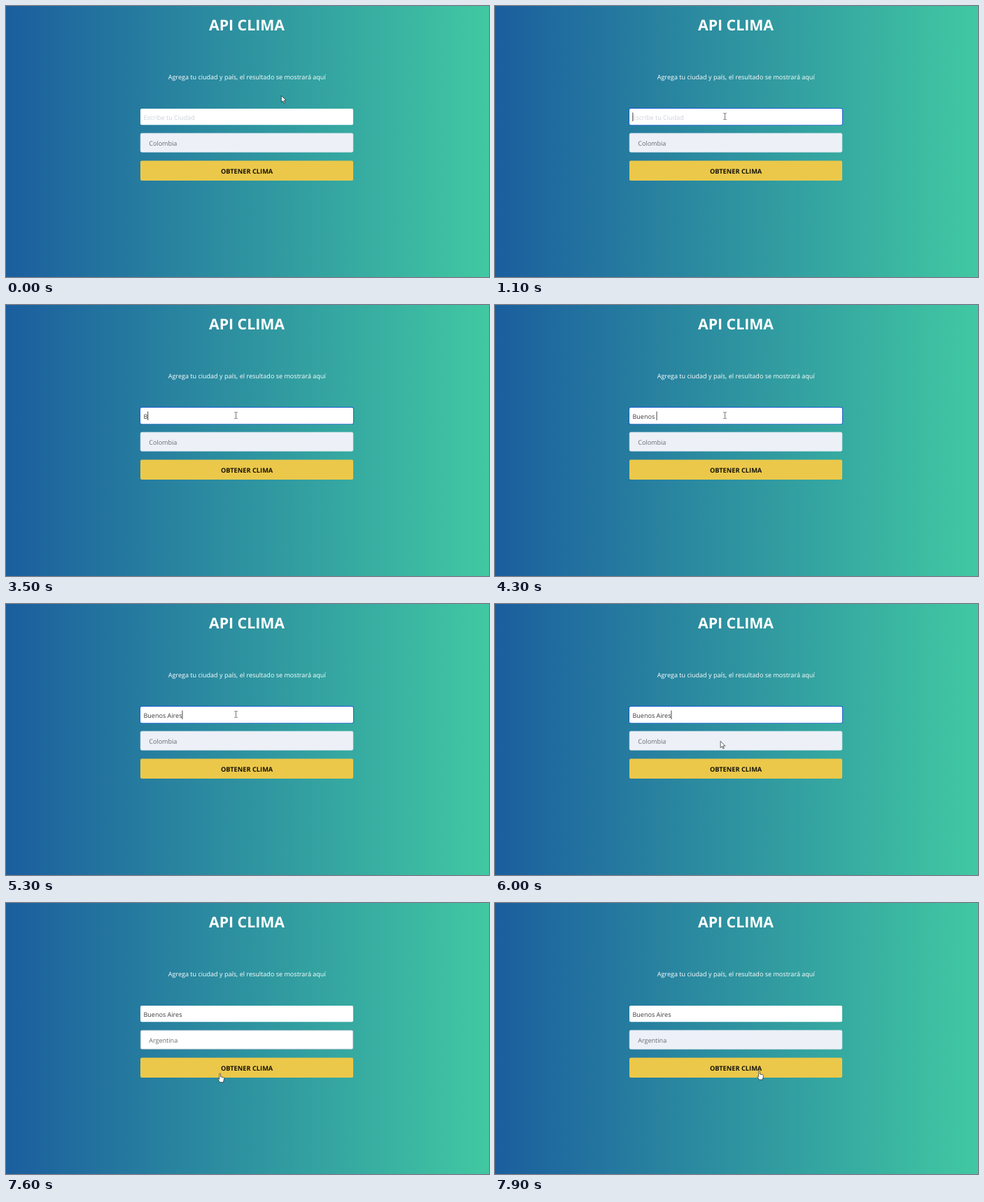
Write an HTML page that moves like this. It is 690 by 388 pixels and loops after 8000 ms.

```html
<!DOCTYPE html>
<html lang="es">
<head>
<meta charset="utf-8">
<title>API Clima</title>
<style>
  html, body { margin: 0; width: 100%; height: 100%; overflow: hidden; }
  body { background: linear-gradient(to right, #1b5e9e, #41c8a2); }
  svg { display: block; width: 690px; height: 388px; }
  text {
    font: 9.05px "Open Sans", "Noto Sans", sans-serif;
    white-space: pre;
    text-rendering: geometricPrecision;
  }
  .mid { text-anchor: middle; }
  .white { fill: #fff; }
  #title { font-size: 21.3px; font-weight: 700; }
  #send { font-size: 9.25px; font-weight: 700; fill: #17140a; }
  #hint { fill: #cdd1d8; }
  #city { fill: #3c3c3c; }
  #country { fill: #686c72; }
  #arrow, #hand { fill: #fff; stroke: #222; stroke-width: .7; stroke-linejoin: round; }
  #beam { fill: none; stroke: #666; stroke-width: .9; }
</style>
</head>
<body>
<svg viewBox="0 0 690 388">
  <text id="title" class="mid white" x="344" y="34.6">API CLIMA</text>
  <text class="mid white" x="344.2" y="105.4">Agrega tu ciudad y país, el resultado se mostrará aquí</text>

  <rect id="ring" x="191" y="146" width="306" height="25" rx="3" fill="#1c5fd0"/>
  <rect x="192" y="147" width="304" height="23.3" rx="2" fill="#fff"/>
  <text id="hint" x="196.4" y="162.6">Escribe tu Ciudad</text>
  <text id="city" x="196.4" y="162.6"></text>
  <rect id="caret" y="152.5" width=".9" height="12.5" fill="#333"/>

  <rect id="select" x="192.2" y="182.2" width="303.6" height="27" rx="2" stroke-width=".6"/>
  <text id="country" x="204.2" y="200"></text>

  <rect x="192" y="221.5" width="304" height="28.5" rx="2" fill="#ebc84a"/>
  <text id="send" class="mid" x="344.1" y="240">OBTENER CLIMA</text>

  <g id="pointer">
    <path id="arrow" d="M.4 .4V9.8L2.6 7.8L4.1 11.1L5.5 10.5L4.1 7.2H7.2Z"/>
    <path id="beam" d="M-2.2-4.5H-.6L0-4L.6-4.5H2.2M0-4V4M-2.2 4.5H-.6L0 4L.6 4.5H2.2"/>
    <path id="hand" d="M-.9 8V1.2a.9.9 0 0 1 1.8 0V5l4.2 1q1 .3 .9 1.4L5.5 10L4.6 13H0L-2.8 8.9q.6-1.5 1.9-.2Z"/>
  </g>
</svg>
<script>
const LOOP = 8000, TICK = 100;
const CITY = "Buenos Aires";
const keyTimes = [3500, 3700, 3800, 4000, 4100, 4200, 4300, 4600, 4800, 4900, 5000, 5200];
const focusAt = 1000, openAt = 6100, pickAt = 7200, sendAt = 7900;

// Pointer path: time, x, y
const path = [
  [500, 393, 128], [900, 328.5, 158], [5500, 328.5, 158], [5900, 321.7, 196],
  [6200, 321.7, 196], [6600, 293, 236], [6800, 284, 252], [7000, 280.5, 245],
  [7500, 280.5, 245], [7800, 377.5, 240]
];

const $ = id => document.getElementById(id);
const show = (id, on) => $(id).style.display = on ? "" : "none";
const within = (v, a, b) => v >= a && v < b;

function pointerAt(t) {
  const i = path.findIndex(p => p[0] > t);
  if (i < 0) return path.at(-1).slice(1);
  if (i === 0) return path[0].slice(1);
  const [t0, x0, y0] = path[i - 1], [t1, x1, y1] = path[i];
  const k = (t - t0) / (t1 - t0), e = k * k * (3 - 2 * k);
  return [x0 + (x1 - x0) * e, y0 + (y1 - y0) * e];
}

function draw(t) {
  const typed = CITY.slice(0, keyTimes.filter(k => k <= t).length);
  const focused = within(t, focusAt, openAt);
  const selecting = within(t, openAt, sendAt);

  $("city").textContent = typed;
  show("hint", !typed);
  show("ring", focused);
  show("caret", focused && !within(t, 1600, 2100) && !within(t, 2700, 3200));
  $("caret").setAttribute("x", 196.4 + (typed ? $("city").getComputedTextLength() : 0));

  $("country").textContent = t < pickAt ? "Colombia" : "Argentina";
  $("select").setAttribute("fill", selecting ? "#fff" : "#edf0f7");
  $("select").setAttribute("stroke", selecting ? "#a0aec0" : "#edf0f7");

  const [x, y] = pointerAt(t);
  const overInput = within(x, 192, 496) && within(y, 147, 170);
  const overButton = t >= pickAt && within(y, 221, 250);
  $("pointer").setAttribute("transform", `translate(${x} ${y})`);
  show("beam", overInput);
  show("hand", overButton);
  show("arrow", !overInput && !overButton);
}

const start = performance.now();
function frame() {
  const t = (performance.now() - start) % LOOP;
  draw(Math.floor(t / TICK) * TICK);
  requestAnimationFrame(frame);
}
frame();
</script>
</body>
</html>
```
